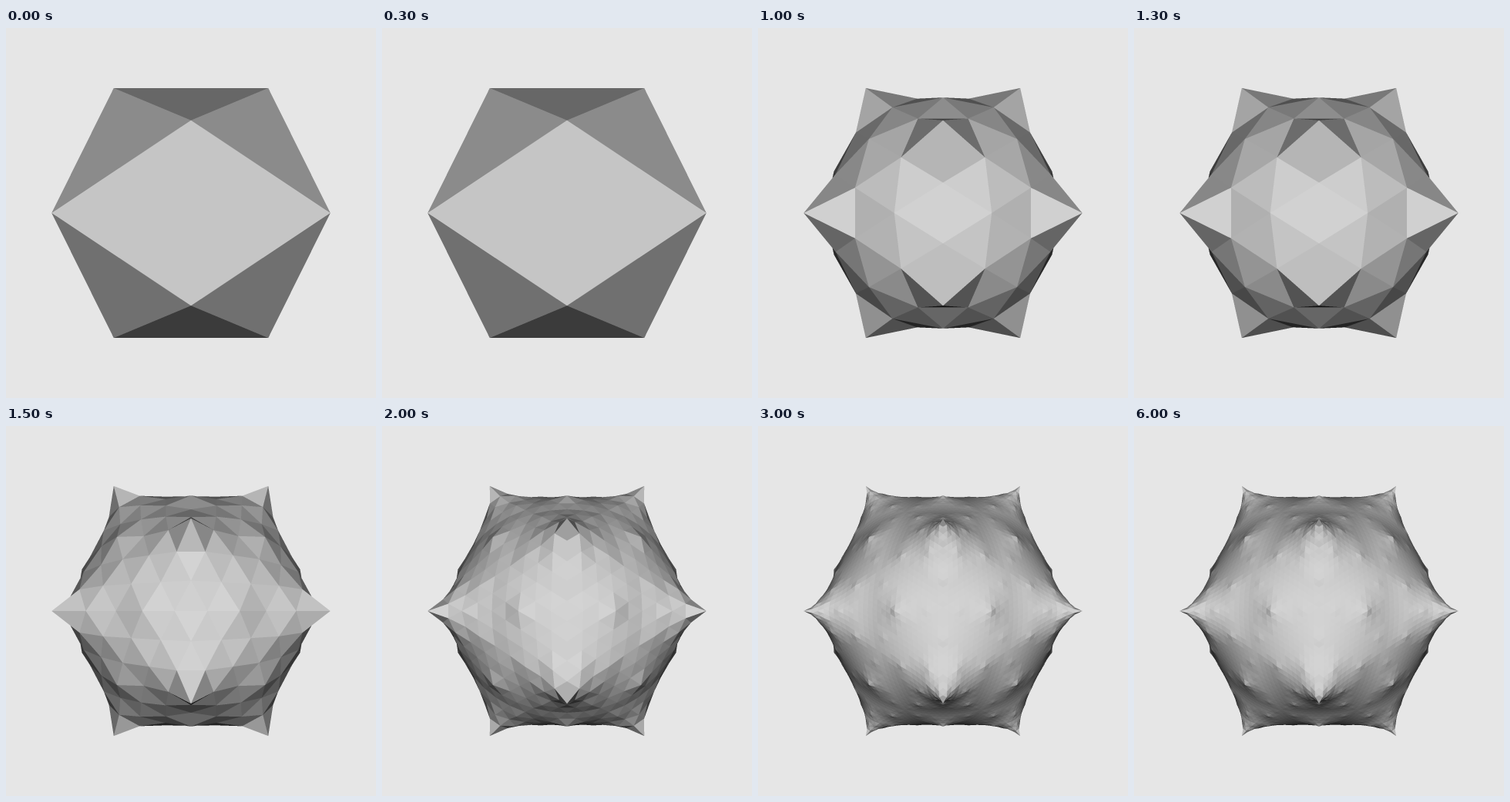
These frames come from a looping animation (480 by 480 pixels, 8 s). An HTML page with a canvas:

```html
<!DOCTYPE html>
<html lang="en">
<head>
<meta charset="utf-8">
<title>Square-root-of-three subdivision</title>
<style>
  html, body { margin: 0; width: 100%; height: 100%; overflow: hidden; background: #e6e6e6; }
  canvas { display: block; width: 480px; height: 480px; }
</style>
</head>
<body>
<canvas id="stage" width="480" height="480"></canvas>
<script>
const SIZE = 480, SS = 3, W = SIZE * SS;
const PHI = (1 + Math.sqrt(5)) / 2;
const SCALE = 100.2, EYE = 9.7;
const BACK = 230, AMBIENT = 9.2, LIGHT = [0, 23.5, 201];
const STEP = 500, LOOP = 8000, LAST = 6;

const ctx = document.getElementById("stage").getContext("2d");

const sub = (a, b) => a.map((v, i) => v - b[i]);
const dot = (a, b) => a[0] * b[0] + a[1] * b[1] + a[2] * b[2];
const cross = (a, b) => [
  a[1] * b[2] - a[2] * b[1],
  a[2] * b[0] - a[0] * b[2],
  a[0] * b[1] - a[1] * b[0]
];

function normal(a, b, c) {
  const n = cross(sub(b, a), sub(c, a));
  const len = Math.hypot(...n);
  return n.map(v => v / len);
}

function icosahedron() {
  const pts = [];
  for (const s of [-1, 1]) for (const t of [-PHI, PHI]) {
    pts.push([0, s, t], [s, t, 0], [t, 0, s]);
  }
  const near = (i, j) => {
    const e = sub(pts[i], pts[j]);
    return Math.abs(dot(e, e) - 4) < 0.01;
  };
  const faces = [];
  for (let i = 0; i < 12; i++)
    for (let j = i + 1; j < 12; j++)
      for (let k = j + 1; k < 12; k++) {
        if (!near(i, j) || !near(j, k) || !near(i, k)) continue;
        const outward = dot(normal(pts[i], pts[j], pts[k]), pts[i]) > 0;
        faces.push(outward ? [i, j, k] : [i, k, j]);
      }
  return { pts, faces };
}

// Add a point at each face centre, then flip every old edge.
function subdivide({ pts, faces }) {
  const next = pts.slice(), centre = new Map(), key = (a, b) => a * 100000 + b;
  for (const f of faces) {
    const [a, b, c] = f.map(i => pts[i]);
    const id = next.push(a.map((v, i) => (v + b[i] + c[i]) / 3)) - 1;
    f.forEach((p, i) => centre.set(key(p, f[(i + 1) % 3]), id));
  }
  const out = [];
  for (const f of faces) f.forEach((a, i) => {
    const b = f[(i + 1) % 3];
    out.push([a, centre.get(key(b, a)), centre.get(key(a, b))]);
  });
  return { pts: next, faces: out };
}

function project([x, y, z]) {
  const inv = 1 / (EYE - z), k = SCALE * EYE * inv;
  return [(SIZE / 2 + x * k) * SS, (SIZE / 2 - y * k) * SS, inv];
}

function fillTriangle(p, q, r, shade, color, depth) {
  const area = (q[0] - p[0]) * (r[1] - p[1]) - (q[1] - p[1]) * (r[0] - p[0]);
  if (Math.abs(area) < 1e-9) return;
  const x0 = Math.ceil(Math.min(p[0], q[0], r[0]) - 0.5);
  const x1 = Math.floor(Math.max(p[0], q[0], r[0]) - 0.5);
  const y0 = Math.ceil(Math.min(p[1], q[1], r[1]) - 0.5);
  const y1 = Math.floor(Math.max(p[1], q[1], r[1]) - 0.5);
  const ux = (r[1] - p[1]) / area, uy = (p[0] - r[0]) / area;
  const vx = (p[1] - q[1]) / area, vy = (q[0] - p[0]) / area;
  const dq = q[2] - p[2], dr = r[2] - p[2];
  for (let y = y0; y <= y1; y++) {
    const dy = y + 0.5 - p[1];
    for (let x = x0; x <= x1; x++) {
      const dx = x + 0.5 - p[0];
      const u = dx * ux + dy * uy, v = dx * vx + dy * vy;
      if (u < -1e-6 || v < -1e-6 || u + v > 1.000001) continue;
      const z = p[2] + u * dq + v * dr, at = y * W + x;
      if (z > depth[at]) {
        depth[at] = z;
        color[at] = shade;
      }
    }
  }
}

function render({ pts, faces }) {
  const color = new Float32Array(W * W).fill(BACK);
  const depth = new Float32Array(W * W);
  const flat = pts.map(project);
  for (const [a, b, c] of faces) {
    const n = normal(pts[a], pts[b], pts[c]);
    if (dot(n, sub([0, 0, EYE], pts[a])) <= 0) continue;
    const shade = AMBIENT + Math.max(0, dot(n, LIGHT));
    fillTriangle(flat[a], flat[b], flat[c], shade, color, depth);
  }
  const img = ctx.createImageData(SIZE, SIZE);
  for (let y = 0; y < SIZE; y++) for (let x = 0; x < SIZE; x++) {
    let sum = 0;
    for (let j = 0; j < SS; j++)
      for (let i = 0; i < SS; i++) sum += color[(y * SS + j) * W + x * SS + i];
    const o = (y * SIZE + x) * 4;
    img.data.fill(Math.round(sum / (SS * SS)), o, o + 3);
    img.data[o + 3] = 255;
  }
  return img;
}

const meshes = [icosahedron()];
while (meshes.length <= LAST) meshes.push(subdivide(meshes[meshes.length - 1]));
const images = meshes.map(render);

let start = null, shown = -1;
function tick() {
  const now = performance.now();
  if (start === null) start = now;
  const level = Math.min(LAST, Math.floor(((now - start) % LOOP) / STEP));
  if (level !== shown) ctx.putImageData(images[shown = level], 0, 0);
  requestAnimationFrame(tick);
}
tick();
</script>
</body>
</html>
```
